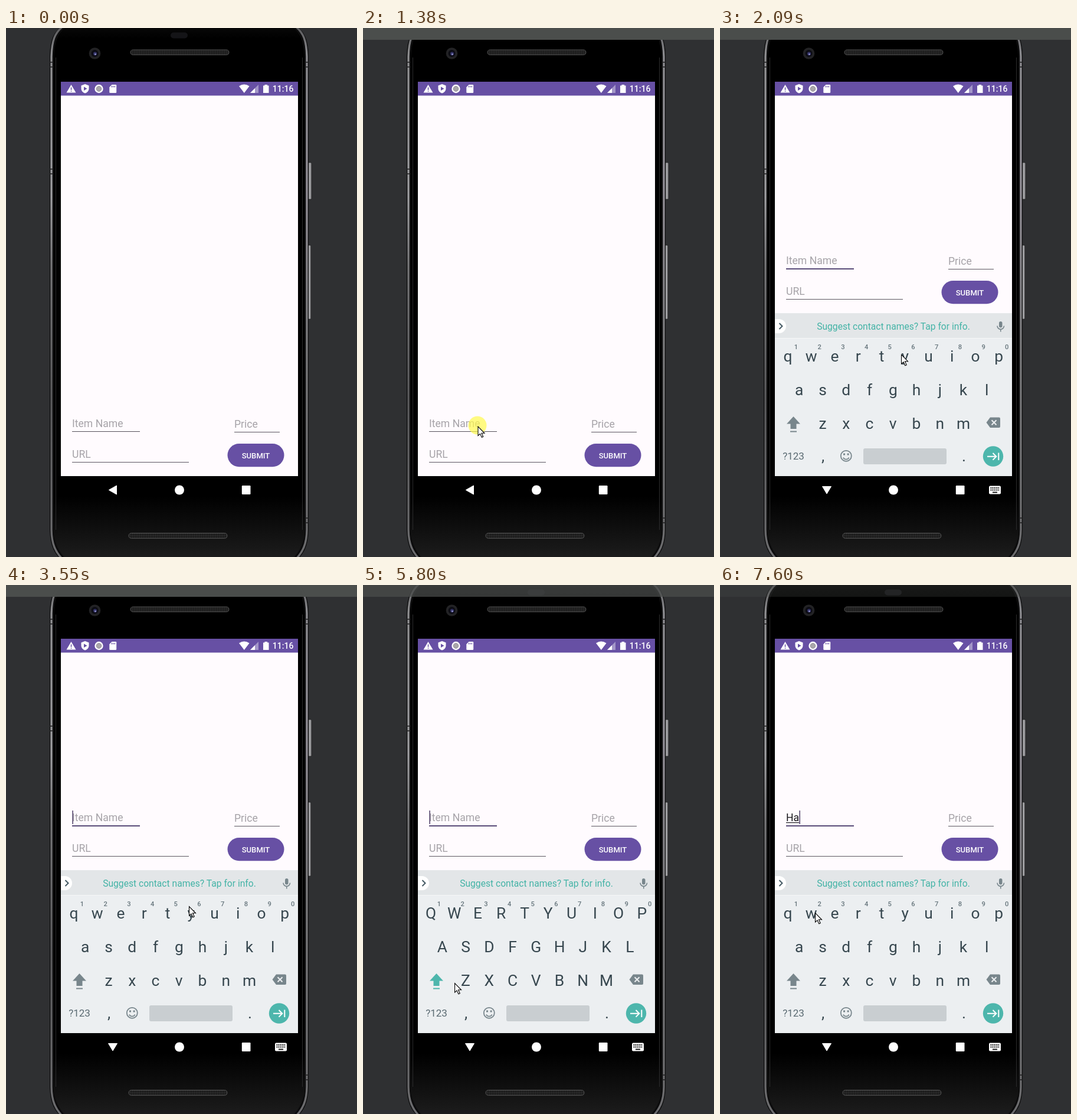
Animation of 595x896 px, one loop 8 s. Source, as an HTML page:

```html
<!DOCTYPE html>
<html lang="en">
<head>
<meta charset="utf-8">
<title>Phone form</title>
<style>
  html, body { margin: 0; width: 100%; height: 100%; overflow: hidden; background: #2f3032; }
  svg { display: block; width: 595px; height: 896px; font-family: Roboto, "Open Sans", sans-serif; }
  .hint { font-size: 17.6px; fill: #a6a3a8; }
  .mid { text-anchor: middle; }
  .key { font-size: 26.4px; fill: #37474f; }
  .num { font-size: 11.2px; font-weight: 500; fill: #66757c; }
</style>
</head>
<body>
<svg viewBox="0 0 595 896" xmlns="http://www.w3.org/2000/svg">
  <defs>
    <linearGradient id="edgeL" gradientUnits="userSpaceOnUse" x1="0" y1="0" x2="0" y2="896">
      <stop offset="0" stop-color="#5a5a5c"/><stop offset=".05" stop-color="#8e8e90"/>
      <stop offset=".2" stop-color="#949497"/><stop offset=".32" stop-color="#9c9c9f"/>
      <stop offset=".45" stop-color="#747476"/><stop offset=".7" stop-color="#59595b"/>
      <stop offset="1" stop-color="#6c6c6e"/>
    </linearGradient>
    <linearGradient id="edgeR" gradientUnits="userSpaceOnUse" x1="0" y1="0" x2="0" y2="896">
      <stop offset="0" stop-color="#5a5a5c"/><stop offset=".05" stop-color="#8c8c90"/>
      <stop offset=".3" stop-color="#938f97"/><stop offset=".6" stop-color="#7a7a7c"/>
      <stop offset="1" stop-color="#6a6a6c"/>
    </linearGradient>
    <linearGradient id="face" gradientUnits="userSpaceOnUse" x1="0" y1="0" x2="0" y2="896">
      <stop offset="0" stop-color="#070707"/><stop offset=".02" stop-color="#000"/>
      <stop offset=".885" stop-color="#000"/><stop offset="1" stop-color="#1c1c1c"/>
    </linearGradient>
    <linearGradient id="side" x1="0" x2="1" y1="0" y2="0">
      <stop offset="0" stop-color="#4c4c4e"/><stop offset=".5" stop-color="#b0b0b3"/><stop offset="1" stop-color="#6b6b6d"/>
    </linearGradient>
    <pattern id="mesh" width="3" height="3" patternUnits="userSpaceOnUse">
      <rect width="3" height="3" fill="#161616"/><circle cx="1.5" cy="1.5" r="1" fill="#3a3a3a"/>
    </pattern>
    <filter id="shade" x="-30%" y="-20%" width="160%" height="140%">
      <feDropShadow dx="0" dy="1" stdDeviation="1.5" flood-opacity=".4"/>
    </filter>
    <clipPath id="screen"><rect x="93" y="91" width="402" height="668"/></clipPath>
  </defs>

  <rect width="595" height="896" fill="#2f3032"/>

  <!-- phone body -->
  <rect x="512" y="228" width="6" height="62" rx="1.5" fill="url(#side)" stroke="#1c1c1d" stroke-width=".6"/>
  <rect x="511" y="368" width="6" height="125" rx="1.5" fill="url(#side)" stroke="#1c1c1d" stroke-width=".6"/>
  <path fill="#0b0b0c" d="M96 -4C80 7 75 20 74 48V850C75 876 81 889 93 900H494C506 889 512 876 513 850V48C512 20 507 7 491 -4Z"/>
  <g fill="none" stroke-width="3.400">
    <path stroke="url(#edgeL)" d="M98 -4C82 8 77.800 22 77 48V850C77.300 874 84 888 96 900"/>
    <path stroke="url(#edgeR)" d="M489 -4C505 8 509.200 22 510 48V850C509.700 874 503 888 491 900"/>
  </g>
  <path fill="url(#face)" stroke="#111" d="M103 -4C86 9 82 24 80.500 50V850C82 872 88 886 102 900H485C499 886 505 872 506.500 850V50C505 24 501 9 484 -4Z"/>
  <path fill="none" stroke="#2b2b2c" d="M84.500 50V850M502.500 50V850"/>
  <path stroke="#1d1d1e" stroke-width="1.500" d="M74 58H80M74 66H80M507 58H513M507 66H513M74 239H80M74 247H80M507 830H513M507 838H513"/>
  <rect x="279" y="7.500" width="29" height="10" rx="5" fill="#141417"/>
  <rect x="211" y="37" width="167" height="8.500" rx="4.200" fill="url(#mesh)" stroke="#505050"/>
  <rect x="208" y="855.500" width="167" height="9" rx="4.500" fill="url(#mesh)" stroke="#505050"/>
  <circle cx="150.500" cy="43" r="9.800" fill="#232325"/>
  <circle cx="150.500" cy="43" r="6" fill="#0c0c14"/>
  <circle cx="151" cy="43.500" r="3" fill="#343468"/>
  <circle cx="151.500" cy="44.500" r="1.200" fill="#a5a5dc"/>

  <!-- app -->
  <rect x="93" y="91" width="402" height="668" fill="#fffbfe"/>
  <g id="form">
    <text id="hint" class="hint" x="112" y="676">Item Name</text>
    <g id="typed">
      <text id="value" x="112" y="676" font-size="17.600" fill="#1c1b1f"></text>
      <path id="mark" stroke="#1c1b1f" stroke-width="1.200"/>
    </g>
    <text class="hint" x="387" y="677">Price</text>
    <text class="hint" x="112" y="728">URL</text>
    <rect id="line" x="112" y="683" width="115" height="1" fill="#56525b"/>
    <path stroke="#5b5761" d="M387 684.500H464M112 735.500H310"/>
    <rect id="caret" y="658" width="1.600" height="23" fill="#57496f"/>
    <rect x="375.500" y="704" width="96" height="39.200" rx="19.600" fill="#6750a4"/>
    <text class="mid" x="423.500" y="728.500" font-size="13.100" font-weight="500" fill="#fff">SUBMIT</text>
  </g>

  <!-- status bar -->
  <rect x="93" y="91" width="402" height="23.500" fill="#6750a4"/>
  <g fill="#fff">
    <path d="M110.500 96L118.500 109.500H102.500Z"/>
    <path d="M134 95L140.500 97.500V102.500C140.500 106.500 137.500 109.500 134 110.500C130.500 109.500 127.500 106.500 127.500 102.500V97.500Z"/>
    <circle cx="157.500" cy="103" r="7.200"/>
    <path d="M179.500 96H186Q187.200 96 187.200 97.200V108.800Q187.200 110 186 110H176.500Q175.300 110 175.300 108.800V100.200Z"/>
    <path d="M395 98.500Q403.800 92.500 412.500 98.500L403.800 110Z"/>
    <path d="M428 96V110H414Z" opacity=".4"/>
    <path d="M422 102V110H414Z"/>
    <path d="M436 97.500H438.500V96H443V97.500H445.500V110H436Z"/>
    <text x="451.800" y="108" font-size="14" font-weight="500">11:16</text>
  </g>
  <g fill="#6750a4">
    <path d="M109.800 100.500H111.300V105H109.800ZM109.800 106.200H111.300V107.700H109.800ZM132 99.500L137.500 102.700L132 106Z"/>
    <path d="M178.800 98H180V100.500H178.800ZM181.300 98H182.500V100.500H181.300ZM183.800 98H185V100.500H183.800Z"/>
  </g>
  <circle cx="157.500" cy="103" r="4.300" fill="#aaa7aa" stroke="#8c8694"/>

  <!-- keyboard -->
  <g clip-path="url(#screen)">
    <g id="board">
      <rect x="93" y="483" width="402" height="276" fill="#eceff1"/>
      <rect x="93" y="483" width="402" height="42" fill="#e3e6e8"/>
      <path stroke="#f5f7f8" d="M93 525.500H495"/>
      <path fill="#fff" d="M93 493H100A12 12 0 0 1 100 517H93Z"/>
      <path fill="none" stroke="#455a64" stroke-width="2" d="M100.500 500L105.500 505L100.500 510"/>
      <text class="mid" x="294" y="511" font-size="15.650" fill="#43b3a6">Suggest contact names? Tap for info.</text>
      <rect x="473" y="497" width="5.500" height="10.500" rx="2.750" fill="#78868c"/>
      <path fill="none" stroke="#78868c" stroke-width="1.600" d="M470 504.500A5.700 5.700 0 0 0 481.500 504.500M475.750 510.500V514.500"/>
      <g id="keys"></g>
      <path id="shift" d="M124.500 658L136 670.500H129.500V679H119.500V670.500H113ZM119 682.500H130V684.500H119Z"/>
      <path fill="#78868c" d="M458 659.500H473Q475 659.500 475 661.500V675Q475 677 473 677H458L451.500 668.200Z"/>
      <path stroke="#eceff1" stroke-width="2" d="M460.500 664.200L468.500 672.200M468.500 664.200L460.500 672.200"/>
      <text class="mid" x="124.500" y="731.300" font-size="17" fill="#5a6a72">?123</text>
      <text class="key mid" x="174.500" y="734">,</text>
      <text class="key mid" x="413.500" y="734">.</text>
      <g fill="none" stroke="#78868c" stroke-width="1.800">
        <circle cx="213.800" cy="724.800" r="9"/><path d="M209 727.500A5.200 5.200 0 0 0 218.600 727.500"/>
      </g>
      <path fill="#78868c" d="M209 720.500H212V723.500H209ZM215.600 720.500H218.600V723.500H215.600Z"/>
      <rect x="243" y="712" width="141" height="27" rx="3" fill="#c9ced1"/>
      <circle cx="463" cy="725.500" r="17.200" fill="#4db6ac"/>
      <path fill="none" stroke="#fff" stroke-width="2" d="M453 725.800H468M462.500 720L468.300 725.800L462.500 731.600M472.300 719.500V732"/>
    </g>
    <g id="popup">
      <rect x="314" y="527" width="40" height="107" rx="3" fill="#d9dbdc" filter="url(#shade)"/>
      <text class="key mid" x="333.500" y="562">H</text>
    </g>
  </g>

  <!-- navigation -->
  <g fill="#fff">
    <path id="back" stroke="#fff" stroke-linejoin="round"/>
    <circle cx="294" cy="782.500" r="8"/>
    <rect x="399.800" y="775" width="14.700" height="15" rx="1.200"/>
    <g id="switch">
      <rect x="456" y="775.500" width="20" height="14" rx="2"/>
      <path stroke="#000" stroke-width="1.800" stroke-dasharray="1.800 1.200" d="M458.500 779H474M458.500 782.500H474"/>
      <path stroke="#000" stroke-width="1.800" d="M462 786.500H470"/>
    </g>
  </g>

  <rect id="bar" width="595" height="20" fill="#4b4e4c"/>
  <circle id="tap" cx="194" cy="673" r="15.500" fill="#fff94d" opacity=".7"/>
  <path id="arrow" fill="#fff" stroke="#000" stroke-width="1.100" d="M.5 .5V16L4 12.800L6.800 18.800L9.200 17.700L6.500 11.800H11.500Z"/>
</svg>
<script>
const LOOP = 8000, PAN = 276;
const $ = id => document.getElementById(id);
const show = (id, on) => $(id).setAttribute('visibility', on ? 'visible' : 'hidden');
const set = (id, attrs) => { for (const k in attrs) $(id).setAttribute(k, attrs[k]); };

// letter keys
const letters = [];
function addText(cls, x, y, s) {
  const el = document.createElementNS('http://www.w3.org/2000/svg', 'text');
  el.setAttribute('class', cls + ' mid');
  el.setAttribute('x', x);
  el.setAttribute('y', y);
  el.textContent = s;
  $('keys').append(el);
  return el;
}
[['qwertyuiop', 115, 565], ['asdfghjkl', 134.3, 622], ['zxcvbnm', 174, 678.5]].forEach(([row, x, y]) =>
  [...row].forEach((c, i) => letters.push(addText('key', x + 39.75 * i, y, c))));
[...'1234567890'].forEach((c, i) => addText('num', 129 + 39.7 * i, 543.5, c));

// keyframes: [time, value, value...]
const pointer = [
  [290, 488, 879], [520, 425, 815], [800, 300, 712], [1040, 227, 676],
  [1110, 222, 675], [1310, 194.5, 674.5], [1890, 194.5, 674.5], [2090, 307, 553], [2210, 310, 544],
  [4290, 310, 544], [4570, 242, 591], [4710, 236, 597], [5110, 151, 673], [5250, 126, 685],
  [5720, 126, 685], [6280, 327, 609], [6760, 327, 609], [7120, 136, 607],
  [7260, 136, 607], [7390, 161, 555]
];
const barFade = [[1110, 0], [1320, 1], [3550, .99], [5110, .88], [6630, .55], [7600, .27], [8000, .17]];
const blinks = [1610, 2030, 2530, 3030, 3550, 4020, 4570, 5050, 5530, 6030, 6560, 7320, 7600];

function along(keys, t) {
  if (t <= keys[0][0]) return keys[0].slice(1);
  for (let i = 1; i < keys.length; i++) {
    const a = keys[i - 1], b = keys[i];
    if (t < b[0]) {
      const p = (t - a[0]) / (b[0] - a[0]);
      return a.slice(1).map((v, j) => v + (b[j + 1] - v) * p);
    }
  }
  return keys[keys.length - 1].slice(1);
}

let wasCaps;
function draw(t) {
  const focused = t >= 1610, open = t >= 1890;
  const caps = t >= 5600 && t < 6830;
  const text = t < 6830 ? '' : t < 7600 ? 'H' : 'Ha';
  const end = [112.3, 124.3, 134.4][text.length];

  set('form', { transform: `translate(0 ${open ? -PAN : 0})` });
  set('line', { height: focused ? 2 : 1, fill: focused ? '#594b78' : '#56525b' });
  show('hint', !text);
  show('typed', text);
  $('value').textContent = text;
  set('mark', { d: `M112 678.500H${end}` });
  set('caret', { x: end });
  show('caret', blinks.filter(b => b <= t).length % 2);

  const rise = Math.min(1, Math.max(0, (t - 1890) / 170));
  show('board', open);
  set('board', { transform: `translate(0 ${90 * (1 - rise) ** 2})`, opacity: Math.min(1, .3 + rise) });
  if (caps !== wasCaps) {
    letters.forEach(el => {
      el.textContent = caps ? el.textContent.toUpperCase() : el.textContent.toLowerCase();
    });
    wasCaps = caps;
  }
  set('shift', { fill: caps ? '#4db6ac' : '#78868c' });
  show('popup', t >= 6560 && t < 6770);

  set('back', { d: t >= 1740 ? 'M173.500 776.500H188.500L181 789Z' : 'M174.300 782.500L187.500 775V790Z' });
  show('switch', t >= 1740);
  set('bar', { opacity: along(barFade, t)[0] });
  show('tap', t >= 1310 && t < 1610);
  show('arrow', t >= 290);
  set('arrow', { transform: `translate(${along(pointer, t).join(' ')})` });
}

const start = performance.now();
function tick() {
  draw((performance.now() - start) % LOOP);
  requestAnimationFrame(tick);
}
tick();
</script>
</body>
</html>
```
